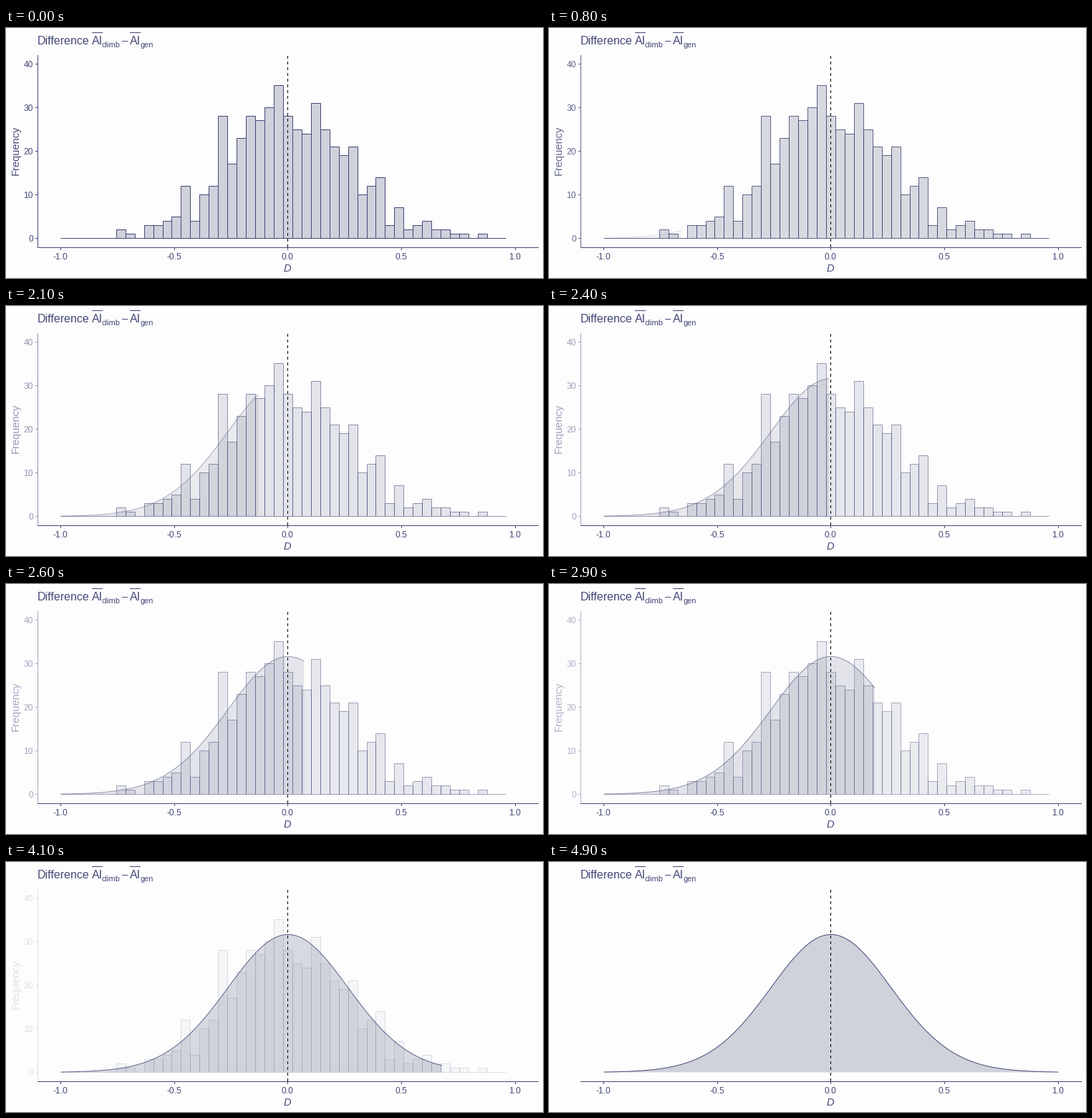
Animation, 750 px wide and 350 px high, one loop 5 s. Source, as a matplotlib script:

```python
import numpy as np
import matplotlib.pyplot as plt
from matplotlib.animation import FuncAnimation
from matplotlib.patches import Rectangle

W, H, DPI = 750, 350, 100
FRAMES, INTERVAL = 50, 100
PX = 72 / DPI  # one pixel in points

INK = tuple(v / 255 for v in (69, 74, 120))
SHADE = tuple(v / 255 for v in (72, 80, 118))
PAPER = "#fdfdfd"
FILL = 0.25
LEFT, RIGHT, TOP, BASE = 44, 743, 38, 307

# Snapping would push half-pixel coordinates to the next pixel
plt.rcParams.update({"font.family": "Liberation Sans", "path.snap": False})

COUNTS = [0] * 6 + [
    2, 1, 0, 3, 3, 4, 5, 12, 4, 10, 12, 28, 17, 23, 28, 27, 30, 35,
    28, 25, 24, 31, 25, 21, 19, 21, 10, 12, 14, 3, 7, 2, 3, 4, 2, 2,
    1, 1, 0, 1, 0, 0]


def x_px(d):
    return 393.4 + 317.4 * d


def y_px(n):
    return 294 - 6.1 * n


def crisp(v):
    return np.round(v) + 0.5


def density(d, peak=31.65, scale=0.2694, df=40):
    return peak * (1 + (d / scale) ** 2 / df) ** (-(df + 1) / 2)


fig = plt.figure(figsize=(W / DPI, H / DPI), dpi=DPI, facecolor=PAPER)
ax = fig.add_axes([0, 0, 1, 1])
ax.set_xlim(0, W)
ax.set_ylim(H, 0)
ax.axis("off")


def line(xs, ys, color=INK, z=3, **kw):
    return ax.plot(xs, ys, color=color, lw=PX, solid_capstyle="butt",
                   zorder=z, **kw)[0]


def label(x, y, s, size, ha="left", **kw):
    return ax.text(x, y, s, size=size * PX, color=INK, ha=ha,
                   va="baseline", **kw)


# Title with overlined means and subscripts
label(43.5, 23, "Difference", 16)
for x, sub in ((120, "climb"), (173, "gen")):
    label(x, 23, "AI", 16)
    line([x, x + 15], [6.5, 6.5])
    label(x + 14, 27, sub, 11)
label(162, 22, "–", 14.5)

# Horizontal axis
line([LEFT, RIGHT + 1], [BASE + 0.5] * 2)
for d in (-1, -0.5, 0, 0.5, 1):
    x = crisp(x_px(d))
    line([x, x], [BASE, BASE + 4])
    label(x - 0.5, 324, f"{d:.1f}", 12, "center")
label(393, 341, "D", 14.67, "center", style="italic")

# Vertical axis, fades with the bars
fading = [line([LEFT + 0.5] * 2, [TOP, BASE + 1])]
for n in range(0, 41, 10):
    y = crisp(y_px(n))
    fading.append(line([LEFT - 3, LEFT], [y, y]))
    fading.append(label(38, y + 4.5, str(n), 12, "right"))
fading.append(label(18, 171.5, "Frequency", 14.67, "center",
                    rotation=90, rotation_mode="anchor"))

# Histogram
edges = crisp(x_px(-1 + np.arange(len(COUNTS) + 1) * 2 / 49))
floor = crisp(y_px(0))
bars = []
for x0, x1, n in zip(edges, edges[1:], COUNTS):
    y = crisp(y_px(n))
    bars.append(ax.add_patch(Rectangle(
        (x0, y), x1 - x0, floor - y, lw=PX, zorder=1)))

# Density curve, two more points per frame
d = np.linspace(-1, 1, 2 * FRAMES)
cx, cy = x_px(d) + 0.5, y_px(density(d)) + 0.5
area = ax.fill([0], [0], lw=0, zorder=2)[0]
curve = line([], [], z=2.5)

line([crisp(x_px(0))] * 2, [BASE, TOP], color="black", z=4,
     linestyle=(0, (4, 4)))


def update(k):
    shown = k / (FRAMES - 1)
    rest = 1 - shown
    for item in fading:
        item.set_alpha(rest)
    for bar in bars:
        bar.set_facecolor((*SHADE, FILL * rest))
        bar.set_edgecolor((*INK, rest))

    m = 2 * k + 2
    xs, ys = cx[:m], cy[:m]
    area.set_xy(np.column_stack([np.r_[xs, xs[-1], xs[0]],
                                 np.r_[ys, floor, floor]]))
    area.set_facecolor((*SHADE, FILL * shown))
    curve.set_data(xs, ys)
    curve.set_alpha(shown)
    return [*fading, *bars, area, curve]


anim = FuncAnimation(fig, update, frames=FRAMES, interval=INTERVAL,
                     repeat=True, repeat_delay=0, blit=False)
plt.show()
```
